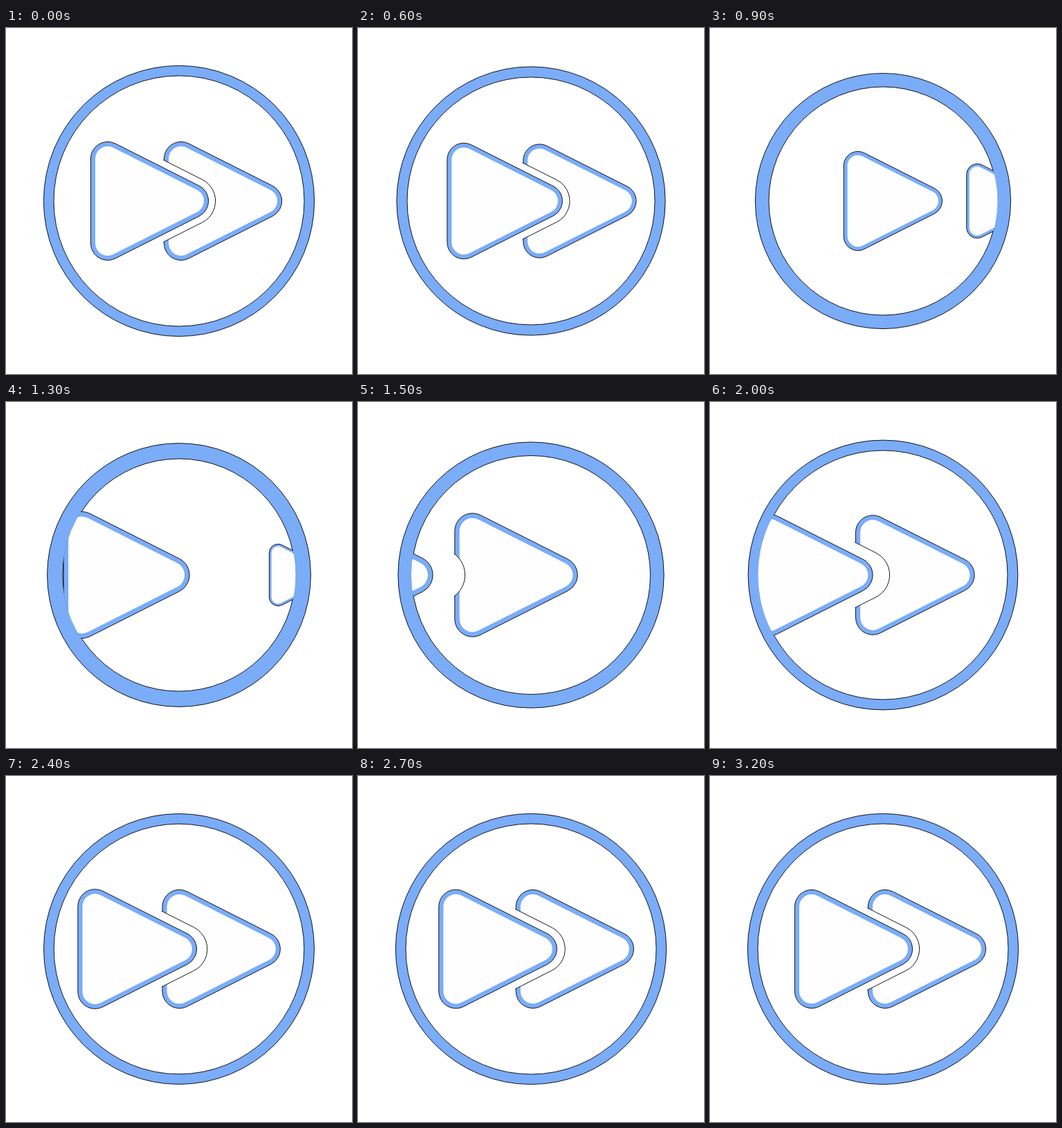
Animation, 500 px wide and 500 px high, one loop 3.7 s. Source, as an HTML page with a canvas:

```html
<!DOCTYPE html>
<html>
<head>
<meta charset="utf-8">
<title>Fast forward</title>
<style>
html, body { margin: 0; width: 100%; height: 100%; overflow: hidden; background: #fff; }
canvas { display: block; }
</style>
</head>
<body>
<canvas id="stage" width="500" height="500"></canvas>
<script>
const ctx = document.getElementById('stage').getContext('2d');
const BLUE = '#7aacf8', MID = 250, LOOP = 3700, STEP = 100;
const REAR = 207.5, FRONT = 313.5;
const CORNER = 25, BORDER = 7, GAP = 9.7;

// Ring: [time, outer radius, inner radius]
const RING = [
  [500, 196, 181], [700, 193, 177], [900, 185, 165], [1000, 184.6, 162.5],
  [1100, 186.5, 163], [1300, 190.8, 168], [1700, 194.2, 177], [2000, 195.3, 180], [2500, 196, 181]
];

function ringAt(t) {
  const i = RING.findIndex(key => key[0] > t);
  if (i <= 0) return RING[0].slice(1);
  const [a, b] = [RING[i - 1], RING[i]];
  const u = (t - a[0]) / (b[0] - a[0]);
  return [1, 2].map(j => a[j] + (b[j] - a[j]) * u);
}

// Speeds up and shrinks towards the right
function leave(t, home, start, speed, shrink) {
  const d = (Math.max(0, t - start) * speed) ** 2;
  return { x: home + d, k: Math.max(0.1, 1 - shrink * d ** 0.8) };
}

// Comes in from the left, slightly enlarged, and settles
function enter(t, home, end, speed, power) {
  const d = (Math.max(0, end - t) * speed) ** power;
  return { x: home - d, k: 1 + d * 0.0005 };
}

// Rounded triangle, its outline moved outwards by grow
function triangle({ x, k }, grow = 0, shift = 0) {
  const p = new Path2D(), r = CORNER * k + grow, cx = x + shift, turn = 1.104;
  p.arc(cx + 60.5 * k, MID, r, -turn, turn);
  p.arc(cx - 60.5 * k, MID + 61 * k, r, turn, Math.PI);
  p.arc(cx - 60.5 * k, MID - 61 * k, r, Math.PI, 2 * Math.PI - turn);
  p.closePath();
  return p;
}

function circle(r) {
  const p = new Path2D();
  p.arc(MID, MID, r, 0, 2 * Math.PI);
  return p;
}

function paint(path, fill, line) {
  ctx.fillStyle = fill;
  ctx.fill(path);
  if (line) ctx.stroke(path);
}

function draw(t) {
  const [outer, inner] = ringAt(t);
  const arrows = [
    leave(t, FRONT, 500, 0.0263, 0.00858),
    leave(t, REAR, 481, 0.018, 0.00642)
  ];
  if (t >= 1000) {
    arrows.push(enter(t, FRONT, 3018, 0.002, 4), enter(t, REAR, 3690, 0.00147, 4.5));
  }

  ctx.lineWidth = 0.9;
  ctx.strokeStyle = '#000';
  paint(new Path2D('M0 0H500V500H0Z'), '#fff');
  paint(circle(outer - 0.4), BLUE, true);
  paint(circle(inner), '#fff', true);

  ctx.save();
  ctx.clip(circle(inner + 0.6));
  arrows.forEach((arrow, i) => {
    paint(triangle(arrow, -0.4), BLUE, true);
    paint(triangle(arrow, -BORDER * arrow.k), '#fefefe');
    const next = arrows[i + 1];
    if (!next) return;
    // The following arrow bites a gap that widens with the distance
    const shift = Math.max(0, arrow.x - next.x - FRONT + REAR) * 0.33;
    ctx.save();
    ctx.clip(triangle(arrow, 0.6));
    paint(triangle(next, GAP * next.k, shift), '#fff', true);
    ctx.restore();
  });
  ctx.restore();
}

const begin = performance.now();
function tick() {
  const t = (performance.now() - begin) % LOOP;
  const stepped = Math.floor(t / STEP) * STEP;
  draw(stepped < 600 || stepped >= 3200 ? 0 : stepped);
  requestAnimationFrame(tick);
}
tick();
</script>
</body>
</html>
```
